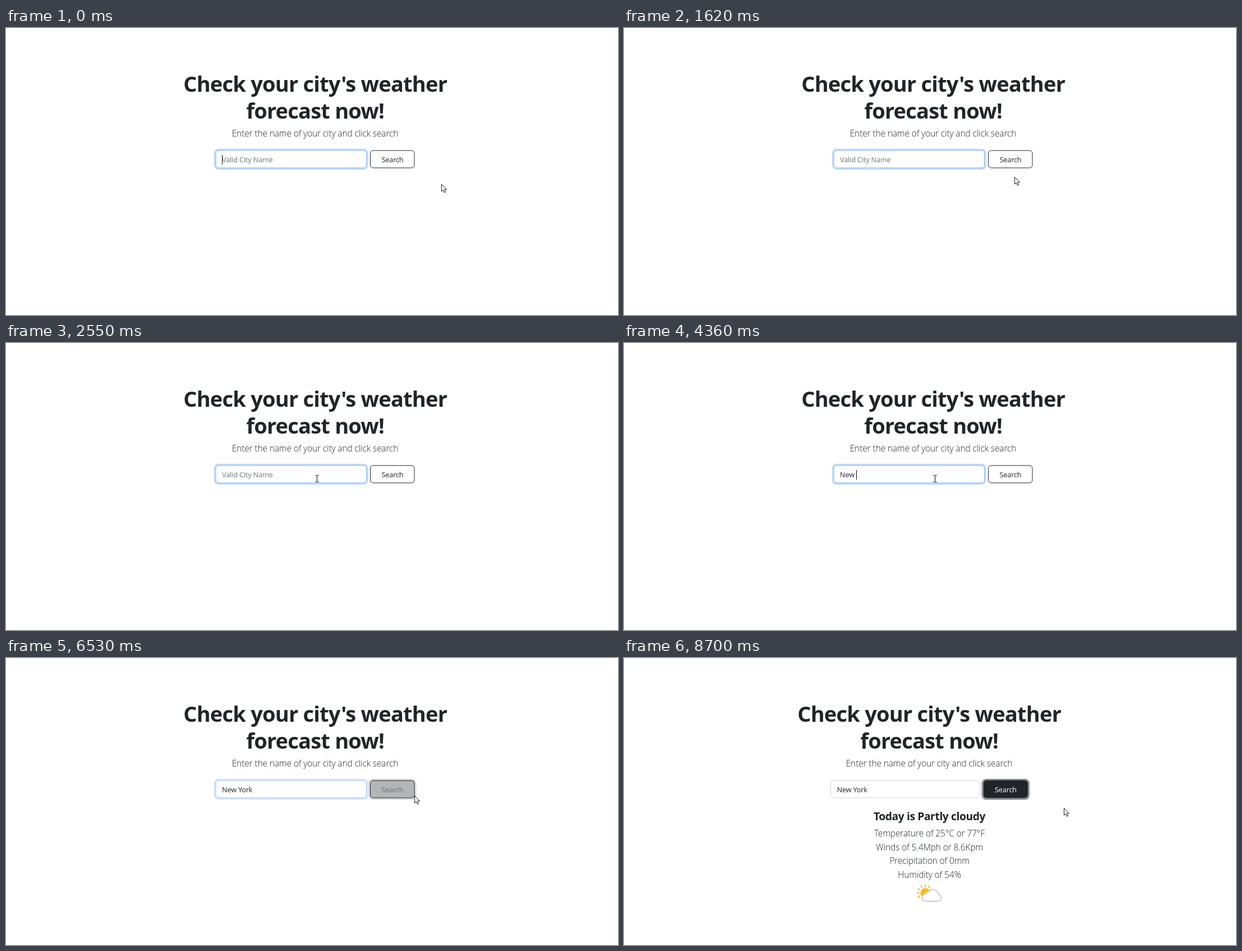
An HTML page for the animation above (9.01 s loop, 1091 by 513 pixels).

```html
<!DOCTYPE html>
<html lang="en">
<head>
<meta charset="utf-8">
<title>Weather search</title>
<style>
  html, body { margin: 0; width: 100%; height: 100%; overflow: hidden; background: #fff; }
  svg { display: block; width: 100%; height: 100%; }
  text { font-family: "Open Sans", "Noto Sans", sans-serif; fill: #212529; white-space: pre; }
  .middle text { text-anchor: middle; }
  .title { font-size: 38px; font-weight: 700; letter-spacing: -.78px; }
  .subtitle { font-size: 19.3px; font-weight: 700; letter-spacing: -.42px; }
  .lead { font-size: 15.6px; font-weight: 300; letter-spacing: -.17px; }
  .control { font-size: 12.7px; letter-spacing: -.15px; }
</style>
</head>
<body>
<svg viewBox="0 0 1091 513">
  <g id="heading" class="middle">
    <text class="title" x="551.2" y="114">Check your city's weather</text>
    <text class="title" x="551.2" y="162">forecast now!</text>
    <text class="lead" x="551" y="194">Enter the name of your city and click search</text>
  </g>

  <g id="field">
    <rect id="fieldRing" x="372.5" y="217.5" width="271.5" height="34" rx="6.5" fill="none" stroke="#0d6efd" stroke-opacity=".25" stroke-width="3.5"/>
    <rect id="fieldBox" x="374" y="219" width="268.5" height="31" rx="5" fill="#fff"/>
    <text id="value" class="control" x="385" y="240"></text>
    <rect id="caret" y="227" width="1" height="17"/>
  </g>

  <g id="button" class="middle">
    <rect id="buttonRing" x="647.5" y="217.5" width="82.5" height="34.5" rx="6.5" fill="none" stroke="#212529" stroke-opacity=".5" stroke-width="3"/>
    <rect id="buttonBox" x="649.5" y="219" width="78.5" height="31" rx="5" stroke="#212529"/>
    <text id="buttonLabel" class="control" x="689" y="240">Search</text>
  </g>

  <g id="report" class="middle">
    <text class="subtitle" x="544.5" y="290">Today is Partly cloudy</text>
    <text class="lead" x="544.5" y="319">Temperature of 25°C or 77°F</text>
    <text class="lead" x="544.5" y="343.5">Winds of 5.4Mph or 8.6Kpm</text>
    <text class="lead" x="544.5" y="368">Precipitation of 0mm</text>
    <text class="lead" x="544.5" y="392.5">Humidity of 54%</text>
  </g>

  <g id="icon">
    <g id="sun" transform="translate(537 420)" stroke="#fdb913" stroke-width="2.2">
      <circle r="8.5" fill="#fdb913" stroke="none"/>
    </g>
    <path d="M537 434.8 a6.3 6.3 0 0 1 -.4 -12.5 a5.6 5.6 0 0 1 6 -3.6 a9.4 9.4 0 0 1 17.6 3.1 a6.6 6.6 0 0 1 -1.2 13 Z"
          fill="#fff" stroke="#d1d3d4" stroke-width="2.5" stroke-linejoin="round"/>
  </g>

  <path id="arrow" d="M.5 .5 V13.2 L3.4 10.5 L5.4 15.2 L7.5 14.3 L5.6 9.7 H9.5 Z" fill="#fff" stroke="#000" stroke-width=".9"/>
  <path id="beam" d="M-3 -6 H-1 L0 -5.5 L1 -6 H3 M0 -5.5 V5.5 M-3 6 H-1 L0 5.5 L1 6 H3" fill="none" stroke="#000"/>
</svg>
<script>
const LOOP = 9010, TAB_AT = 6480, FADE = 150, REPORT_AT = 7030, ICON_AT = 7120;
const $ = id => document.getElementById(id);

// [time, x, y] of the pointer's hot spot
const pointerPath = [
  [0, 776, 279], [70, 776, 279], [210, 771, 280], [369, 771, 280], [370, 770, 280],
  [680, 770, 280], [920, 763, 278], [1060, 763, 278], [1080, 761, 278], [1230, 761, 278],
  [1620, 696, 266], [2110, 570, 246.5], [2300, 559, 243.5], [2550, 554.5, 242.5],
  [5830, 554.5, 242.5], [6130, 754, 267], [6420, 728, 246],
  [8490, 728, 246], [8700, 784, 268], [LOOP, 784, 268]
];
const typing = [
  [0, ''], [3280, 'N'], [3480, 'Ne'], [3740, 'Nee'], [4110, 'Ne'], [4210, 'New'], [4360, 'New '],
  [4960, 'New Y'], [5060, 'New Yo'], [5160, 'New Yor'], [5310, 'New York']
];
const caretSpans = [[0, 200], [740, 1280], [1830, 2380], [2920, 4860], [4960, 5830], [6360, TAB_AT]];

const show = (id, on) => $(id).setAttribute('visibility', on ? 'visible' : 'hidden');
const move = (id, x, y = 0) => $(id).setAttribute('transform', `translate(${x} ${y})`);
const mix = (a, b, p) => a + (b - a) * p;
const blend = (from, to, p) => `rgb(${from.map((v, i) => Math.round(mix(v, to[i], p)))})`;
const WHITE = [255, 255, 255], DARK = [33, 37, 41], BLUE = [134, 183, 254], GREY = [206, 212, 218];

for (let angle = 150; angle <= 300; angle += 30) {
  const ray = document.createElementNS('http://www.w3.org/2000/svg', 'path');
  ray.setAttribute('d', 'M11 0 H15');
  ray.setAttribute('transform', `rotate(${angle})`);
  $('sun').append(ray);
}

function pointerAt(t) {
  const i = pointerPath.findIndex(point => point[0] > t);
  const [t0, x0, y0] = pointerPath[i - 1], [t1, x1, y1] = pointerPath[i];
  const p = (t - t0) / (t1 - t0);
  return [mix(x0, x1, p), mix(y0, y1, p)];
}

function drawField(t, focus) {
  const text = typing.filter(([start]) => start <= t).pop()[1];
  const value = $('value');
  value.textContent = text || 'Valid City Name';
  value.style.fill = text ? '#212529' : '#6c757d';
  $('caret').setAttribute('x', 385 + (text ? Math.floor(value.getComputedTextLength()) : 0));
  show('caret', caretSpans.some(([on, off]) => t >= on && t < off));
  $('fieldBox').setAttribute('stroke', blend(GREY, BLUE, focus));
  $('fieldRing').setAttribute('opacity', focus);
}

function drawButton(focus) {
  $('buttonRing').setAttribute('opacity', focus);
  $('buttonBox').setAttribute('fill', blend(WHITE, DARK, focus));
  $('buttonLabel').style.fill = blend(DARK, WHITE, focus);
}

function drawPointer(t) {
  const [x, y] = pointerAt(t);
  const overField = x > 374 && x < 643 && y > 219 && y < 250;
  show('arrow', !overField);
  show('beam', overField);
  move('arrow', Math.round(x), Math.round(y));
  move('beam', Math.floor(x) + .5, Math.floor(y) + .5);
}

function draw(now) {
  const t = now % LOOP;
  const tabbed = Math.min(1, Math.max(0, (t - TAB_AT) / FADE));
  const reported = t >= REPORT_AT;
  drawField(t, 1 - tabbed);
  drawButton(tabbed);
  drawPointer(t);
  // the scrollbar that comes with the report narrows the page
  move('heading', reported ? -7 : 0);
  move('field', reported ? -5.5 : 0);
  move('button', reported ? -8.5 : 0);
  $('fieldBox').setAttribute('width', reported ? 266 : 268.5);
  show('report', reported);
  show('icon', t >= ICON_AT);
}

const start = performance.now();
(function frame() {
  draw(performance.now() - start);
  requestAnimationFrame(frame);
})();
</script>
</body>
</html>
```
